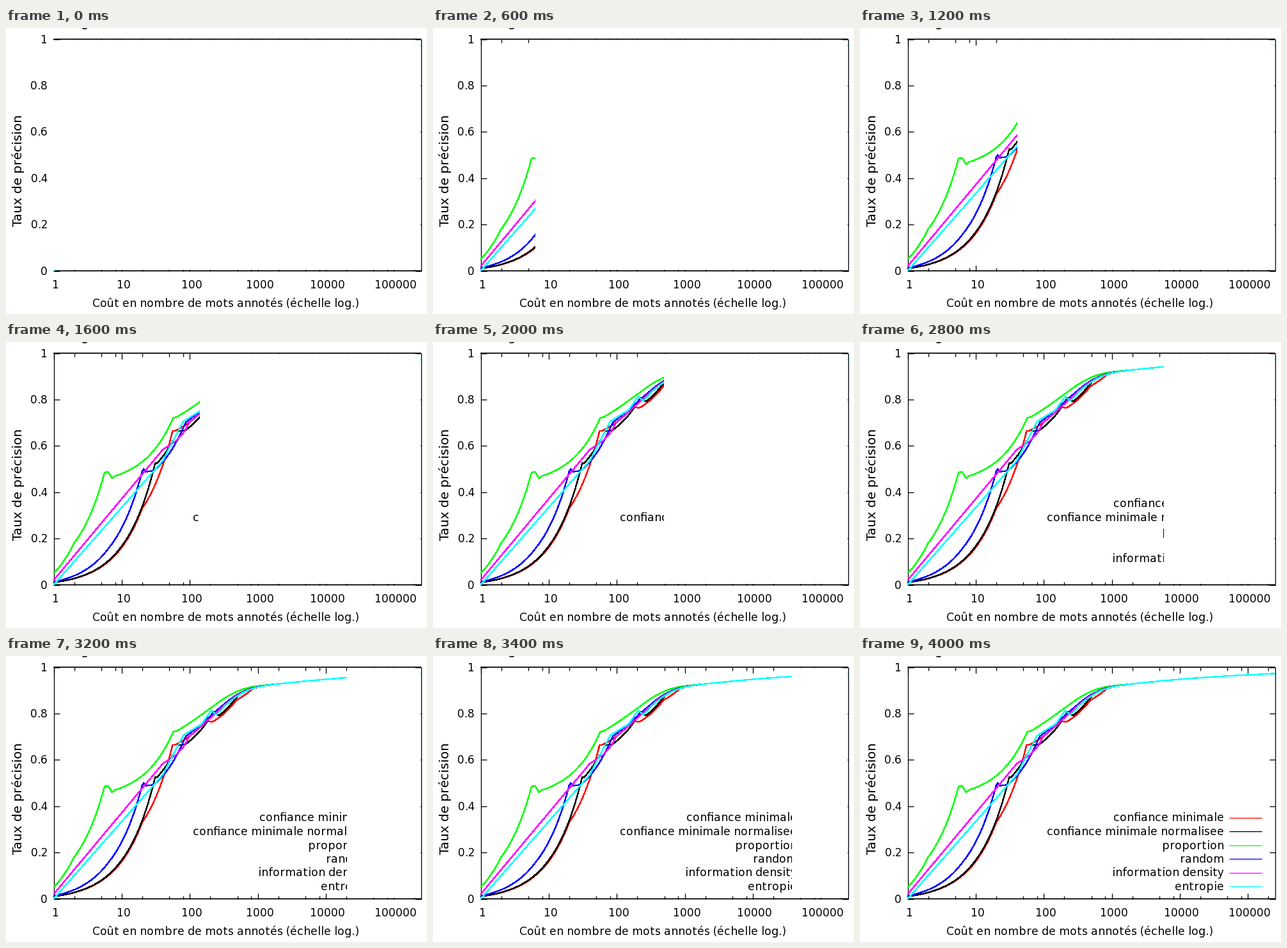
A matplotlib script for the animation above (4.2 s loop, 658 by 447 pixels).

```python
import matplotlib.pyplot as plt
import numpy as np
from matplotlib.animation import FuncAnimation
from matplotlib.patches import Rectangle

W, H, DPI = 658, 447, 64
PT = 72 / DPI                       # points per pixel
LEFT, RIGHT, TOP, BOTTOM = 74.5, 648.5, 17.5, 379.5
N_MAX = 250000
DECADE = (RIGHT - LEFT) / np.log10(N_MAX)
FRAMES, INTERVAL = 21, 200

plt.rcParams.update({"font.family": "DejaVu Sans", "text.hinting_factor": 1})
fig = plt.figure(figsize=(W / DPI, H / DPI), dpi=DPI, facecolor="white")
ax = fig.add_axes([0, 0, 1, 1])
ax.set(xlim=(0, W), ylim=(H, 0))
ax.axis("off")


def line(xs, ys, color="black", width=1.3, **kw):
    ax.plot(xs, ys, color=color, lw=width * PT, solid_capstyle="butt", **kw)


def label(x, y, text, size=17, ha="center", **kw):
    ax.text(x, y, text, fontsize=size * PT, ha=ha, va="baseline", **kw)


def x_pos(n):
    return LEFT + DECADE * np.log10(n)


def y_pos(p):
    return BOTTOM + (TOP - BOTTOM) * p


def plateau(n):
    """Precision shared by all strategies once enough words are annotated."""
    return 1 - 0.33 * n ** -0.2 - 0.27 * np.exp(-n / 225)


def draw_curve(color, start, bonus, log_straight, z):
    """Join the (words, precision) start points, then follow the plateau."""
    n0, p0 = np.array(start).T
    late = np.geomspace(n0[-1] * 1.15, N_MAX, 120)
    n = np.append(n0, late)
    p = np.append(p0, plateau(late) + bonus * np.exp(-late / 350))
    grid = np.union1d(np.geomspace(1, N_MAX, 575), n)
    scale = np.log if log_straight else np.asarray
    line(x_pos(grid), y_pos(np.interp(scale(grid), scale(n), p)), color,
         zorder=z, antialiased=False)


# Frame, ticks and axis labels
for y in (TOP, BOTTOM):
    line([LEFT - 0.5, RIGHT + 0.5], [y, y], width=1.8, snap=False)
for x in (LEFT, RIGHT):
    line([x, x], [TOP, BOTTOM])

for exponent in range(6):
    for m in (1, 2, 5, 8):
        x, size = x_pos(m * 10 ** exponent), 9 if m == 1 else 5
        if x < RIGHT:
            line([x, x], [TOP, TOP + size])
            line([x, x], [BOTTOM, BOTTOM - size])
    label(x_pos(10 ** exponent) + 3, 407, str(10 ** exponent))

for i in range(6):
    y = y_pos(i / 5)
    line([LEFT, LEFT + 9], [y, y])
    line([RIGHT, RIGHT - 9], [y, y])
    label(65, y + 6, f"{i / 5:g}", ha="right")

label(343.5, 436, "Coût en nombre de mots annotés (échelle log.)")
label(25.5, 222, "Taux de précision", 19.8, rotation=90, rotation_mode="anchor")

# Lower edge of the cropped heading
label(123, -1.5, "g", 20)
label(211, -1.5, ",", 20)

# Name, colour, start of the curve, bonus over the plateau, straight on log axis
series = [
    ("conﬁance minimale", "#ff0000",
     [(1, .01), (20, .33), (56, .665), (61, .665), (170, .77), (213, .763),
      (485, .858), (920, .918)], 0, False),
    ("conﬁance minimale normalisee", "#000000",
     [(1, .01), (10, .167), (31, .525), (33, .525), (67, .663), (85, .666),
      (222, .808), (269, .791), (452, .858)], 0, False),
    ("proportion", "#00ff00",
     [(1, .05), (2, .18), (5.6, .485), (6.3, .488), (7.2, .46), (8, .47),
      (57, .72)], .085, False),
    ("random", "#0000ff",
     [(1, .012), (6.3, .155), (20, .49), (21, .5), (22, .488), (30, .493),
      (77, .667)], .025, False),
    ("information density", "#ff00ff",
     [(1, .02), (40, .583), (62, .62), (85, .664)], .01, True),
    ("entropie", "#00ffff",
     [(1, 0), (40, .535), (80, .705), (150, .755), (207, .813), (246, .794),
      (283, .813)], 0, True),
]
for i, (name, color, start, bonus, log_straight) in enumerate(series):
    draw_curve(color, start, bonus, log_straight, 3 + 0.1 * i)
    y = 252.5 + 21.5 * i
    label(569, y + 6, name, ha="right")
    line([577, 628], [y, y], color)

# White cover sliding off to the right
cover = Rectangle((LEFT, 19), 0, 359, fc="white", lw=0, zorder=10)
ax.add_patch(cover)


def update(k):
    edge = 74 + 574 * k // (FRAMES - 1)
    cover.set_x(edge)
    cover.set_width(648 - edge)
    return [cover]


anim = FuncAnimation(fig, update, frames=FRAMES, interval=INTERVAL,
                     repeat=True, repeat_delay=0, blit=False)
plt.show()
```
